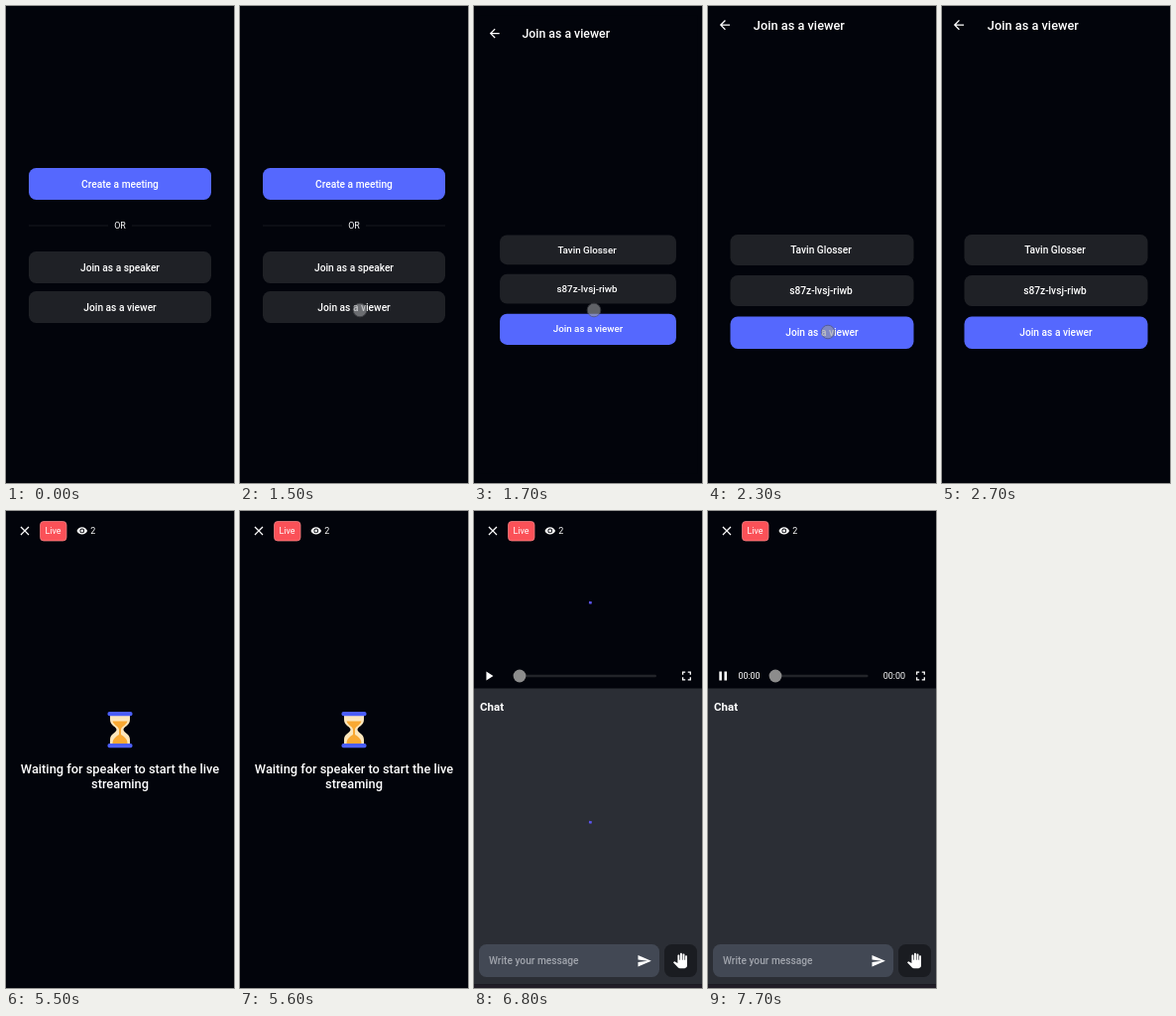
Animation, 230 px wide and 480 px high, one loop 8000 ms. Source, as an HTML page:

```html
<!DOCTYPE html>
<html lang="en">
<head>
<meta charset="utf-8">
<title>Meeting app</title>
<style>
  html, body { margin: 0; width: 100%; height: 100%; overflow: hidden; background: #02040b; }
  svg { display: block; width: 100%; height: 100%; }
  text { font: 500 10.2px Roboto, sans-serif; fill: #fff; }
  .mid { text-anchor: middle; }
  .title { font-size: 12.8px; }
  .small { font-size: 8.95px; font-weight: 400; }
  .bg { fill: #02040b; width: 230px; height: 480px; }
  .box { fill: #1f2126; rx: 7.5px; }
  .primary { fill: #5568fe; }
  .icon { fill: #fff; }
  .spin { fill: none; stroke: #5b54ec; stroke-width: 2.5; }
  .track { fill: #222429; }
  .thumb { fill: #8c8c8c; }
</style>
</head>
<body>
<svg viewBox="0 0 230 480">
  <rect class="bg"/>

  <g id="menu">
    <rect class="box primary" x="23" y="163" width="184" height="32"/>
    <rect class="box" x="23" y="247" width="184" height="32"/>
    <rect class="box" x="23" y="287" width="184" height="32"/>
    <path d="M23 221H103M127 221H207" stroke="#16191f"/>
    <g class="mid">
      <text x="115" y="183">Create a meeting</text>
      <text class="small" x="115" y="224.3">OR</text>
      <text x="115" y="266.7">Join as a speaker</text>
      <text x="115" y="306.8">Join as a viewer</text>
    </g>
  </g>

  <g id="viewer">
    <rect class="bg"/>
    <path class="icon" transform="translate(9.3 11.4) scale(.639)" d="M20 11H7.83l5.59-5.59L12 4l-8 8 8 8 1.41-1.41L7.83 13H20z"/>
    <text class="title" x="45.8" y="24">Join as a viewer</text>
    <rect class="box" x="22.5" y="230" width="185" height="31"/>
    <rect class="box" x="22.5" y="271" width="185" height="31"/>
    <rect class="box primary" x="22.5" y="312.5" width="185" height="32.5"/>
    <g class="mid">
      <text x="114" y="249">Tavin Glosser</text>
      <text x="114" y="290">s87z-lvsj-riwb</text>
      <text x="115" y="332">Join as a viewer</text>
    </g>
  </g>

  <g id="room">
    <rect class="bg"/>
    <text id="creating" class="title mid" x="114.6" y="242.4">Creating a Room</text>
  </g>

  <g id="waiting">
    <rect class="bg"/>
    <path fill="#fce6bb" d="M105 205H125V210C125 216 118.500 217 118.500 220S125 224 125 230V235H105V230C105 224 111.500 223 111.500 220S105 216 105 210Z"/>
    <path fill="#f9a933" d="M107.500 211.500H122.500C121.500 215.500 116 217 116 220V225C119 227 122.500 229 122.500 234H107.500C107.500 229 111 227 114 225V220C114 217 108.500 215.500 107.500 211.500Z"/>
    <rect fill="#4c5ffa" x="102.500" y="202" width="25" height="4.300" rx="1.800"/>
    <rect fill="#4c5ffa" x="102.500" y="234" width="25" height="4.300" rx="1.800"/>
    <text class="title mid" x="115" y="264.300">Waiting for speaker to start the live</text>
    <text class="title mid" x="115" y="278.800">streaming</text>
  </g>

  <g id="live">
    <rect class="bg"/>
    <rect x="0" y="178.500" width="230" height="298" fill="#2b2e35"/>
    <rect x="0" y="476.500" width="230" height="3.500" fill="#211d27"/>
    <path id="videoSpin" class="spin" pathLength="100" d="M115 92a11.500 11.500 0 0 1 0 23a11.500 11.500 0 0 1 0-23"/>
    <path id="chatSpin" class="spin" pathLength="100" d="M115 313a11.500 11.500 0 0 1 0 23a11.500 11.500 0 0 1 0-23"/>
    <g id="loading">
      <path class="icon" transform="translate(7.300 158.300) scale(.639)" d="M8 5v14l11-7z"/>
      <rect class="track" x="46" y="164.700" width="138" height="2.600" rx="1.300"/>
      <circle class="thumb" cx="46" cy="166" r="6.400"/>
    </g>
    <g id="ready">
      <path class="icon" transform="translate(7.500 158.300) scale(.639)" d="M6 19h4V5H6zM14 5v14h4V5z"/>
      <text class="small" x="30.400" y="169.200">00:00</text>
      <rect class="track" x="68" y="164.700" width="93.500" height="2.600" rx="1.300"/>
      <circle class="thumb" cx="68" cy="166" r="6.400"/>
      <text class="small" x="176.700" y="169.200">00:00</text>
    </g>
    <path class="icon" transform="translate(206.800 158.300) scale(.639)" d="M7 14H5v5h5v-2H7zM5 10h2V7h3V5H5zM17 17h-3v2h5v-5h-2zM14 5v2h3v3h2V5z"/>
    <text x="6" y="201.200" style="font-size:11.500px;font-weight:700">Chat</text>
    <rect class="box" x="5" y="436" width="182" height="33" style="fill:#424854"/>
    <text x="15" y="456.300" style="fill:#a1a5ad">Write your message</text>
    <path class="icon" transform="translate(164.200 445) scale(.639)" d="M2 21L23 12 2 3V10l15 2-15 2z"/>
    <rect class="box" x="192" y="436" width="33" height="33" style="fill:#1a1c21"/>
    <path class="icon" transform="translate(200.300 444.800) scale(.639)" d="M23 5.500V20c0 2.200-1.800 4-4 4h-7.300c-1.080 0-2.100-.43-2.850-1.190L1 14.830s1.260-1.230 1.300-1.250c.22-.19.49-.29.79-.29.22 0 .42.06.6.16L8 15.910V4c0-.83.67-1.500 1.500-1.500S11 3.170 11 4v7h1V1.500c0-.83.67-1.500 1.500-1.500S15 .67 15 1.500V11h1V2.500c0-.83.67-1.500 1.500-1.500s1.500.67 1.500 1.500V11h1V5.500c0-.83.67-1.500 1.500-1.500s1.500.67 1.500 1.500z"/>
  </g>

  <g id="header">
    <path class="icon" transform="translate(11.300 12.300) scale(.639)" d="M19 6.410L17.590 5 12 10.590 6.410 5 5 6.410 10.590 12 5 17.590 6.410 19 12 13.410 17.590 19 19 17.590 13.410 12z"/>
    <rect x="34.500" y="10.500" width="26.500" height="19.500" rx="3.500" fill="#fb5158" stroke="#ff8a8c" stroke-width=".7"/>
    <text class="small mid" x="47.500" y="23.400">Live</text>
    <path class="icon" fill-rule="evenodd" transform="translate(71 14.200) scale(.479)" d="M12 4.500C7 4.500 2.730 7.610 1 12c1.730 4.390 6 7.500 11 7.500s9.270-3.110 11-7.500c-1.730-4.390-6-7.500-11-7.500zM12 17a5 5 0 1 1 0-10 5 5 0 0 1 0 10zm0-8a3 3 0 1 0 0 6 3 3 0 0 0 0-6z"/>
    <text class="small" x="85.300" y="23.400">2</text>
  </g>

  <circle id="touch" r="6.800" fill="#9a9ca0" stroke="#55575b"/>
</svg>
<script>
const LOOP = 8000, STEP = 100;
const el = id => document.getElementById(id);
const clamp = v => Math.max(0, Math.min(1, v));
const ease = v => v * v * (3 - 2 * v);
const show = (id, opacity) => el(id).setAttribute('opacity', +opacity);

// A page zooms up to full size while it fades in.
function enter(id, age) {
  const scale = 1 - 0.15 * Math.exp(-Math.max(0, age) / 110);
  show(id, clamp(age / 100));
  el(id).setAttribute('transform', `translate(115 240) scale(${scale}) translate(-115 -240)`);
}

// Arc whose head runs ahead of its tail while the whole ring turns.
function spin(id, cy, age, visible) {
  const p = age / 1333 % 1;
  const head = 75 * ease(clamp(2 * p)), tail = 75 * ease(clamp(2 * p - 1));
  const angle = age / 2222 * 360 + tail * 3.6;
  el(id).setAttribute('transform', `rotate(${angle} 115 ${cy})`);
  el(id).setAttribute('stroke-dasharray', `${Math.max(4, head - tail)} 100`);
  show(id, visible);
}

function touch(t) {
  const first = t < 2200;
  const age = t - (first ? 1500 : 2300);
  el('touch').setAttribute('cx', 121);
  el('touch').setAttribute('cy', first ? 306 : 328);
  show('touch', age >= 0 && age < 400 ? 0.62 * clamp((400 - age) / 200) : 0);
}

function draw(now) {
  const t = Math.floor(now % LOOP / STEP) * STEP;
  enter('viewer', t - 1550);
  enter('room', t - 2750);
  show('creating', 0.85 + 0.15 * clamp((t - 3300) / 300));
  show('waiting', t >= 5500);
  show('header', t >= 5500);
  show('live', t >= 6800);
  spin('videoSpin', 103.5, t - 6770, t < 7400);
  spin('chatSpin', 324.5, t - 6770, t < 7200);
  show('loading', t < 7400);
  show('ready', t >= 7400);
  touch(t);
  requestAnimationFrame(() => draw(performance.now()));
}
draw(0);
</script>
</body>
</html>
```
